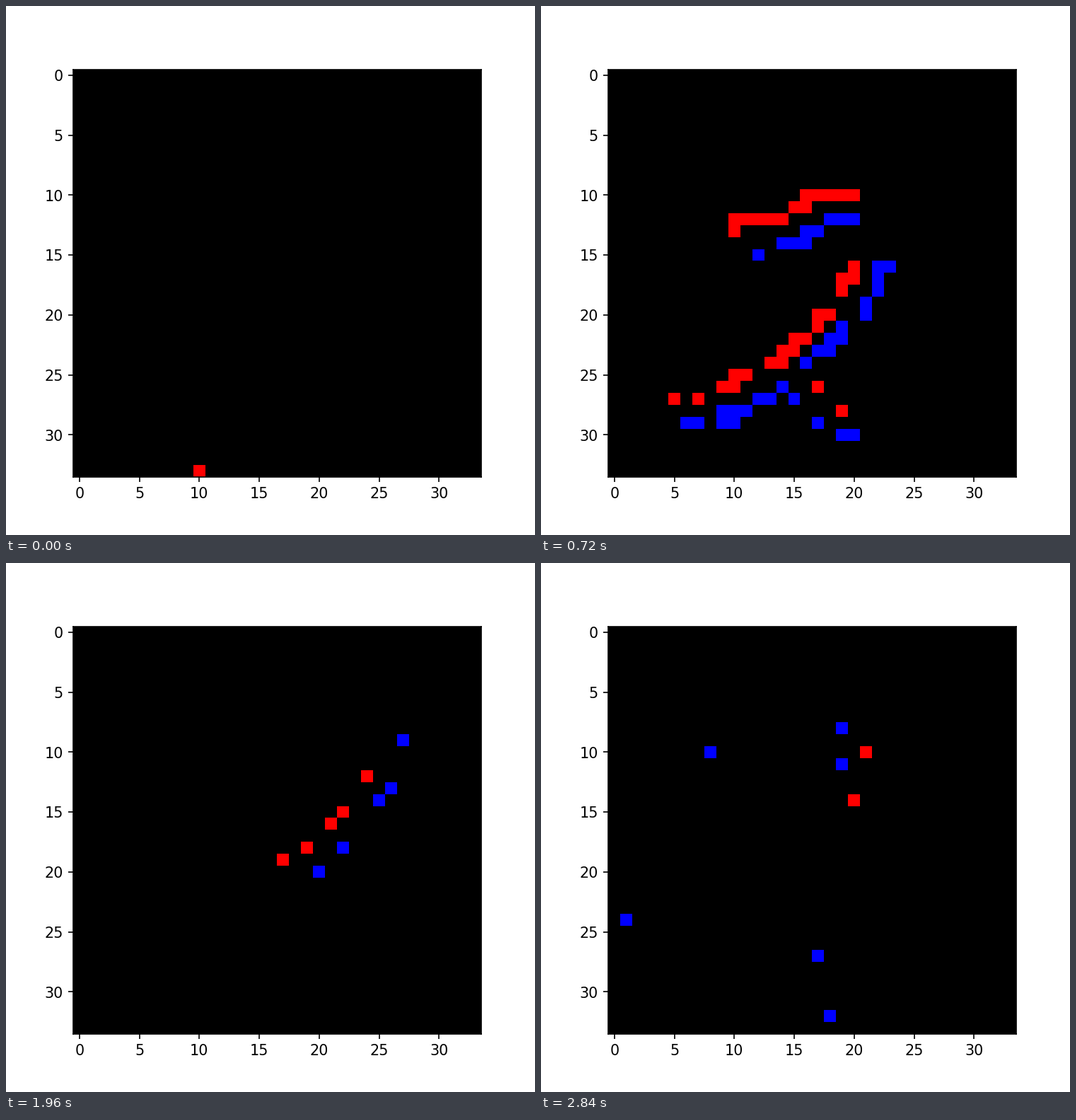
Write a matplotlib script that moves like this. It is 748 px wide and 748 px high and loops after 2880 ms.

```python
import numpy as np
import matplotlib.pyplot as plt
from matplotlib.animation import FuncAnimation

SIZE = 34
FRAMES = 72
LEG = FRAMES // 3
QUIET = 5  # frames before the camera starts to move
RED, BLUE = 0, 2

# The camera runs around a triangle; the second side bends (degrees per leg)
CORNERS = np.array([(-4.8, -1), (-2.4, 4.2), (1.2, -1.8)])
BEND = (0, 225, 0)

ys, xs = np.mgrid[:SIZE, :SIZE].astype(float)


def bezier(p, q, r, s, n=24):
    t = np.linspace(0, 1, n)[:, None]
    p, q, r, s = (np.array(v, float) for v in (p, q, r, s))
    return (1 - t)**3 * p + 3 * t * (1 - t)**2 * q + 3 * t**2 * (1 - t) * r + t**3 * s


HEAD = bezier((14, 10.5), (20, 9), (24.8, 5), (24.5, 11.5))
STEM = bezier((24.5, 11.5), (23.4, 18), (14, 24.6), (9.6, 24.7))
BODY = np.vstack([HEAD, STEM])
TAIL = np.linspace((17.5, 22.2), (22.3, 26), 12)


def stroke(points, flare, x, y):
    """Soft brightness around a curve that widens towards its ends."""
    u = np.linspace(-1, 1, len(points))[:, None, None]
    width = 1.1 + flare * np.abs(u)**3
    px, py = points.T[:, :, None, None]
    return (1 / (1 + (np.hypot(x - px, y - py) / width)**4)).max(axis=0)


def digit(shift):
    x, y = xs - shift[0], ys - shift[1]
    return np.maximum(stroke(BODY, 0.6, x, y), 0.8 * stroke(TAIL, 0, x, y))


def camera(frame):
    """Shift, unit direction and event strength at a frame."""
    leg, step = divmod(frame - QUIET, LEG)
    s = step / LEG
    begin, end = CORNERS[leg], CORNERS[(leg + 1) % 3]
    chord = end - begin
    shift = begin + chord * (1 - (1 - s)**2)
    angle = np.arctan2(chord[1], chord[0]) + np.radians(BEND[leg] * (s - 0.45))
    level = 0.34 + 0.66 * np.exp(-((s - 0.33) / 0.22)**2)
    return shift, np.array([np.cos(angle), np.sin(angle)]), level


def events(frame):
    img = np.zeros((SIZE, SIZE, 3))
    rng = np.random.default_rng(400 + frame)
    if frame >= QUIET:
        shift, way, level = camera(frame)
        change = digit(shift + way / 2) - digit(shift - way / 2)
        fired = level * np.abs(change)**0.6 > 0.2 + 0.3 * rng.random(change.shape)
        img[..., BLUE] = fired & (change > 0)
        img[..., RED] = fired & (change < 0)
    for _ in range(rng.poisson(2)):
        x, y = rng.integers(0, SIZE, 2)
        img[y, x, rng.choice([RED, RED, BLUE])] = 1
    return img


fig, ax = plt.subplots(figsize=(5, 5), dpi=149.65)
picture = ax.imshow(events(0), interpolation="nearest")


def draw(frame):
    picture.set_data(events(frame))
    return [picture]


anim = FuncAnimation(fig, draw, frames=FRAMES, interval=40, repeat=True, repeat_delay=0)
plt.show()
```
